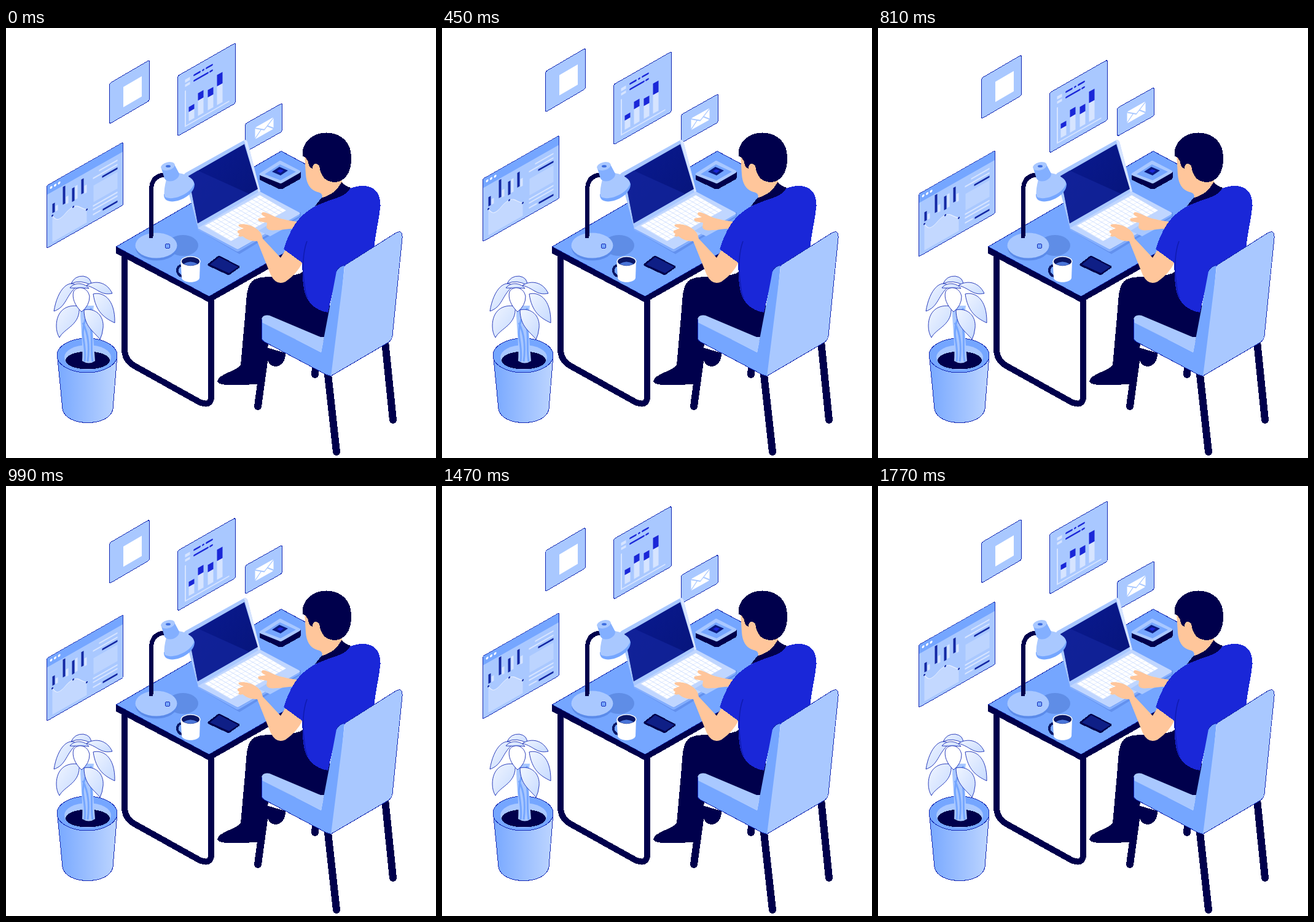
These frames come from a looping animation (700x700 px, 1.8 s). An HTML page:

```html
<!DOCTYPE html>
<html lang="en">
<head>
<meta charset="utf-8">
<title>Desk work</title>
<style>
  html, body { margin: 0; width: 100%; height: 100%; overflow: hidden; background: #fff; }
  svg { display: block; width: 100vw; height: 100vh; }
  .light { fill: #a9c8ff; }
  .mid { fill: #75a6ff; }
  .pale { fill: #d6e4ff; }
  .white { fill: #fff; }
  .royal { fill: #1a27d8; }
  .navy { fill: #00004c; }
  .skin { fill: #ffc69b; }
  .line { fill: none; stroke: #00004c; stroke-linecap: round; stroke-linejoin: round; }
  .edge { stroke: #1429b4; stroke-width: 1; }
  .leaf { stroke: #1429b4; stroke-width: .9; }
  .edge, .navy, .line, .body { shape-rendering: crispEdges; }
</style>
</head>
<body>
<svg viewBox="0 0 700 700">
  <defs>
    <linearGradient id="pot"><stop offset="0" stop-color="#78a8ff"/><stop offset="1" stop-color="#bdd5ff"/></linearGradient>
    <linearGradient id="leafFill" x1="0" y1="0" x2="1" y2="1"><stop offset="0" stop-color="#f0f5ff"/><stop offset="1" stop-color="#c6daff"/></linearGradient>
    <linearGradient id="screen" x1="0" y1="0" x2="1" y2="1"><stop offset="0" stop-color="#0a1a92"/><stop offset="1" stop-color="#061478"/></linearGradient>
    <pattern id="keys" width="7.15" height="16.67" patternUnits="userSpaceOnUse">
      <path d="M0 0H7.15M0 0V16.67" stroke="#c3d7ff" stroke-width="1.6" fill="none"/>
    </pattern>
  </defs>

  <!-- floating panels -->
  <g id="tile"><g transform="matrix(1 -.585 0 1 168.5 91)">
    <rect class="light edge" width="65" height="66" rx="3"/>
    <rect class="white" x="22.5" y="19" width="30" height="33"/>
  </g></g>

  <g id="chart"><g transform="matrix(1 -.57 0 1 279.5 78)">
    <rect class="light edge" width="94" height="98" rx="3"/>
    <path class="pale" d="M12 13h8v5h-8zM12 21h8v4h-8z"/>
    <path stroke="#1a27d8" stroke-width="2.8" stroke-linecap="round" d="M27 14H36M41 14H42M47 14H56M27 23H49M53 23H56"/>
    <path fill="none" stroke="#d6e4ff" stroke-width="2" d="M12.5 31V89H84"/>
    <path class="pale" d="M18 69h9v15h-9zM33 59h9v25h-9zM49 63h9v21h-9zM64 53h9v31h-9z"/>
    <path class="royal" d="M18 61h9v8h-9zM33 47h9v12h-9zM49 51h9v12h-9zM64 35h9v18.500h-9z"/>
  </g></g>

  <g id="mail"><g transform="matrix(1 -.56 0 1 389.500 156)">
    <rect class="light edge" width="60" height="46" rx="3"/>
    <rect class="white" x="16" y="15" width="30" height="19" rx="2"/>
    <path fill="none" stroke="#a9c8ff" stroke-width="1.6" d="M16 16L31 27L46 16M16 33L26 23.500M46 33L36 23.500"/>
  </g></g>

  <g id="board"><g transform="matrix(1 -.568 0 1 66.5 257)">
    <rect class="light edge" width="124" height="102" rx="2"/>
    <path class="mid" d="M.5 2Q.5 .5 2 .5H122Q123.500 .5 123.500 2V15H.5Z"/>
    <path stroke="#fff" stroke-width="4" stroke-linecap="round" d="M7 7h.1M13.500 7h.1M20 7h.1"/>
    <path class="pale" d="M14 41h4v9h-4zM31 36h4v12h-4zM46 27h4v22h-4zM61 35h4v13h-4z"/>
    <path fill="#1429a4" d="M9 35h4v15h-4zM26 17h4v29h-4zM41 28h4v22h-4zM56 22h4v24h-4z"/>
    <path fill="#c3d8ff" d="M9 54C15 66 19 67 25 65S34 58 43 59S55 69 65 76V97H9Z"/>
    <path fill="none" stroke="#e4edff" d="M9 54C15 66 19 67 25 65S34 58 43 59S55 69 65 76"/>
    <path stroke="#1429a4" stroke-width="3" stroke-linecap="round" d="M9 54h.1M43 59h.1M65 76h.1"/>
    <rect x="76" y="43" width="39" height="27" fill="#bcd4ff"/>
    <path stroke="#d6e4ff" stroke-width="2.4" d="M85 24H115M75 31H115M75 76H115M75 82H115M75 90H88"/>
    <path stroke="#1429a4" stroke-width="3" d="M90 37H115M91 91H115"/>
  </g></g>

  <!-- desk -->
  <path class="line" stroke-width="10" d="M193 366V522Q193 541 209 550L315 609Q334 617 334 600V442"/>
  <path class="mid edge" d="M179.500 356L448 200.500L552 256L545 313L330.500 437Z"/>
  <path class="navy" d="M179 356L330.500 437L470 357V368L331 447L179 367Z"/>

  <!-- laptop -->
  <path fill="#6391ee" d="M320 333L380 368L480 307V300Z"/>
  <path class="light" d="M290 241Q289 238 292 236L387 183Q391 181 393 185L414 266L313 327Z"/>
  <path fill="#d6e4ff" d="M387 183Q391 181 393 185L414 266L411 268L389 187Z"/>
  <path fill="url(#screen)" d="M297 241L388 189L410 262L312 318Z"/>
  <path fill="#14269e" opacity=".7" d="M297 241L312 232L396 270L312 318Z"/>
  <path fill="#c0d6ff" d="M312 326L413 266L477 300Q480 302 477 304L380 359Q377 361 374 359Z"/>
  <path fill="#84afff" d="M312 326L375 359.500Q378 361 381 359L478 303V306L380 363Q377 365 374 363L313 329Z"/>
  <g transform="matrix(.9 -.5 .43 .25 323 322)">
    <rect class="white" width="100" height="100"/>
    <rect fill="url(#keys)" width="100" height="100"/>
  </g>
  <path fill="#a9c8ff" d="M411 330L431 318L450 328L430 339Z"/>

  <!-- desk box -->
  <path class="navy" d="M413 238L447 253L480 234V243Q480 245 477 247L450 262Q447 263 444 262L415 248Q413 247 413 245Z"/>
  <path class="light" d="M414 240Q411 238 414 236L444 217Q446 215 449 217L478 232Q481 234 478 236L450 252Q447 254 444 252Z"/>
  <path class="mid" d="M421 238L446 222L472 234L447 248Z"/>
  <path fill="#0a1a82" d="M433 234L445 226L459 232L447 240Z"/>
  <path class="royal" d="M441 233L446 230L452 232L447 236Z"/>

  <!-- lamp -->
  <ellipse cx="288" cy="354" rx="25" ry="17" fill="#5f8de6"/>
  <ellipse cx="245" cy="358" rx="34" ry="20.500" fill="#5b8bea"/>
  <ellipse class="light" cx="244.500" cy="354" rx="34" ry="20.500"/>
  <circle class="mid edge" cx="263" cy="355" r="4"/>
  <path class="line" stroke-width="7" d="M236 339V267Q236 239 260 239"/>
  <path class="mid" d="M257 271C256 294 307 279 307 254C305 246 290 236 280 238Z"/>
  <path class="light" d="M262 243L281 236C293 238 305 245 306 252C305 267 273 283 259 275Q255 268 262 243Z"/>
  <path fill="#83afff" d="M252.500 227L258 245C264 255 283 247 282 237L274 222Z"/>
  <ellipse class="light" cx="263.500" cy="225" rx="11.500" ry="6.500" transform="rotate(-14 263.500 225)"/>
  <ellipse fill="#3f6fe0" cx="264" cy="225" rx="4" ry="2"/>

  <!-- mug and phone -->
  <path class="line" stroke-width="4" style="stroke:#0a1766" d="M287 387C276 385 276 404 288 404"/>
  <path class="white" d="M284.500 380L286 407C288 416 313 416 315 407L316 380Z"/>
  <ellipse class="white" cx="300.500" cy="380" rx="16" ry="8.500"/>
  <ellipse fill="#0a1766" cx="300.500" cy="380" rx="14.500" ry="7.200"/>
  <path fill="#4a75d8" d="M289 384Q300 377 312 384Q301 390 289 384Z"/>
  <path class="navy" d="M329 387Q327 385 330 383L344 372Q347 370 350 372L379 387Q382 389 379 391L365 401Q362 403 359 401Z"/>
  <path fill="#0f1f86" d="M332 385L347 373L378 389L363 399Z"/>

  <!-- plant -->
  <path fill="url(#pot)" class="edge" d="M83.500 533L92 620C96 650 170 650 174 620L181 533Z"/>
  <ellipse class="mid edge" cx="132" cy="533" rx="49" ry="28"/>
  <ellipse class="light" cx="133" cy="536" rx="38" ry="20"/>
  <ellipse class="navy" cx="133" cy="541" rx="36" ry="14.500"/>
  <path fill="#a9c8ff" d="M121 452H143C139 480 143 515 145 542Q135 549 124 542C126 515 120 480 121 452Z"/>
  <path fill="none" stroke="#75a6ff" stroke-width="3" d="M139 456Q122 480 126 505T128 543M128 458C146 490 136 515 141 543M125 480Q138 505 133 543"/>
  <g class="leaf" fill="url(#leafFill)">
    <path d="M116 420C103 408 84 424 78 461C99 454 97 435 116 420Z"/>
    <path d="M106 416Q112 403 126 404Q139 406 139 419Q122 409 106 416Z"/>
    <path d="M131 419C145 410 164 413 173 432C154 436 150 424 131 419Z"/>
    <path d="M104 423C113 412 130 416 135 424C122 422 113 424 104 423Z"/>
    <path d="M142 433C157 429 178 440 177 480C160 472 146 462 142 433Z"/>
    <path d="M119 453C98 449 82 461 82 485Q82 496 87 504C95 488 122 484 119 453Z"/>
    <path d="M127 459C145 455 160 468 158 488Q157 499 153 507C143 494 127 486 127 459Z"/>
    <path d="M110 429C116 419 133 421 136 437Q136 452 123 462C112 452 107 439 110 429Z" fill="#fff"/>
  </g>

  <!-- chair legs and trousers -->
  <path class="line" stroke-width="12" d="M617 510L630 638M524 564L538 690M421 535L410 616M504 552L503 564"/>
  <path class="navy" d="M424 520L426 540Q428 551 441 551Q455 547 455 529Z"/>
  <path class="navy" d="M486 395C470 410 425 400 405 409C390 417 392 440 389 470L382 549C372 560 345 563 344 576C348 585 392 580 412 580Q420 577 423 550L428 505L520 510L530 455Z"/>

  <!-- arms -->
  <path class="skin" d="M481 315C468 316 456 312 446 310C435 307 424 299 418 300Q412 303 423 308L411 310Q409 313 413 315L425 317L424 324Q425 331 440 329C453 329 465 324 480 328Z"/>
  <path class="skin" d="M458 356L447 374L418 343Q416 331 405 325C397 320 385 318 379 320Q376 323 387 326L377 330Q376 334 380 335L378 338Q381 341 385 339Q396 348 409 347L431 402Q440 420 455 413Q474 400 483 381Z"/>

  <!-- neck, head -->
  <path class="skin" d="M486 207L488 238C489 252 494 263 507 267Q515 268 515 275L510 288L551 258L540 235L515 205Z"/>
  <path class="navy" d="M483 209C480 186 500 170 522 170.500C548 171 563 188 562 214C562 237 550 251 535 251C520 250 515 243 511 231Q511 221 503 221Q499 222 499 229Q493 228 492 218Q488 209 483 209Z"/>

  <!-- shirt -->
  <path class="royal body" d="M510 287L557 263C572 255 590 255 600 263Q610 272 609.500 290C607 315 601 335 599 360L540 395L524 463C503 460 490 446 486 430C482 412 483 398 482 382L452 360C462 330 474 303 510 287Z"/>
  <path fill="none" stroke="#101bb0" stroke-width="1.6" d="M490 347C483 365 482 395 486 418Q487 432 491 440"/>
  <path class="navy" d="M503 290L513 277Q537 270 546 251Q550 256 561 260Q555 272 534 278Q517 284 503 290Z"/>

  <!-- chair -->
  <path class="mid" d="M416 478L513 528L538 396Q541 388 551 387L545 450L530 566Q526 567 519 563L421 511Q416 508 416 502Z"/>
  <path class="light" d="M416 479V474Q418 466 429 468L512 503H518L513 528Z"/>
  <path class="light" d="M551 391Q551 387 555 384L634 334Q646 327 645 342L629 501Q628 508 622 512L529 567Z"/>
  <path class="edge" fill="none" d="M538 396Q541 388 555 384L634 334Q646 327 645 342L629 501Q628 508 622 512L529 566.500Q525 566 519 563L421 511Q416 508 416 502V474"/>
</svg>
<script>
  // Vertical drift: offset, cos, sin, cos 2x, sin 2x
  const drift = {
    tile: [-2.3, 1.5, -17.8, 0, 0],
    chart: [14, -14, 0, 0, 0],
    mail: [-14.45, 13.2, 0.77, 1.25, 0],
    board: [8, -9.7, -18, 1.3, -0.7]
  };
  const loop = 1800, step = 30;
  const panels = Object.entries(drift).map(([id, k]) => [document.getElementById(id), k]);

  function draw() {
    const t = Math.floor(performance.now() % loop / step) * step;
    const a = t / loop * 2 * Math.PI;
    for (const [el, [o, c, s, c2, s2]] of panels) {
      const y = o + c * Math.cos(a) + s * Math.sin(a) + c2 * Math.cos(2 * a) + s2 * Math.sin(2 * a);
      el.setAttribute('transform', `translate(0 ${y.toFixed(2)})`);
    }
    requestAnimationFrame(draw);
  }
  draw();
</script>
</body>
</html>
```
